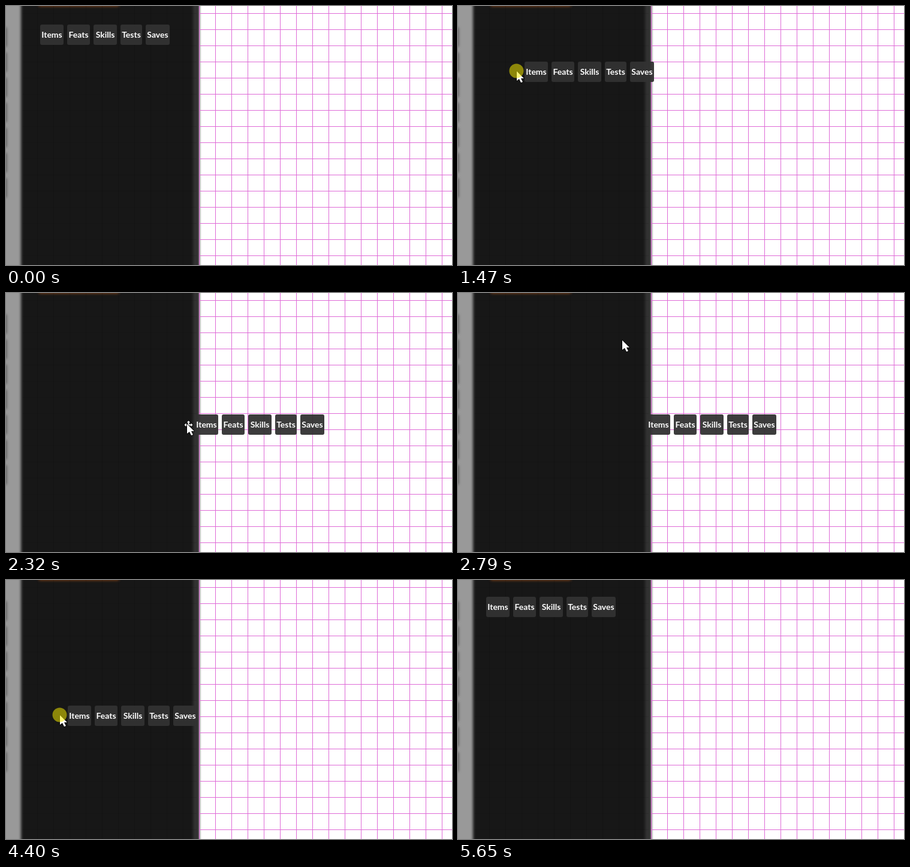
Write an HTML page with a canvas that moves like this. It is 744 px wide and 433 px high and loops after 5.97 s.

```html
<!DOCTYPE html>
<html lang="en">
<head>
<meta charset="utf-8">
<style>
  html, body { margin: 0; width: 744px; height: 433px; overflow: hidden; }
  canvas { display: block; }
</style>
</head>
<body>
<canvas id="stage" width="744" height="433"></canvas>
<script>
const W = 744, H = 433, LOOP = 5970, TICKS = 77, CELL = 27;
const ctx = document.getElementById('stage').getContext('2d', { willReadFrequently: true });

const WEAPONS = ['Bite', 'Claw', 'Tail'];
let right = 0;
const TABS = Object.entries({ Items: 39, Feats: 38, Skills: 39, Tests: 36, Saves: 40 }).map(([text, width]) => {
  const tab = { text, width, left: right };
  right += width + 6;
  return tab;
});

// Turning points of the dragged bar: tick, position.
const BAR = [[13, [57, 31]], [16, [28, 62]], [20, [139, 103]], [25, [343, 159]], [30, [315, 203]],
  [51, [315, 203]], [57, [103, 210]], [62, [67, 67]], [67, [47, 28]]];

const ARROW = new Path2D('M0 0v16l4-3 3 6 3-1-3-6h5z');
const HAND = new Path2D('M-2 1q2-3 4 0v8l5 1q3 1 2 6l-2 7h-8l-5-9q-1-3 2-2l2 2z');
const MOVE = new Path2D('M0-7l3 3h-2v3h3v-2l3 3-3 3v-2h-3v3h2l-3 3-3-3h2v-3h-3v2l-3-3 3-3v2h3v-3h-2z');

function along(keys, n) {
  const i = keys.findIndex(([tick]) => tick >= n);
  if (i < 0) return keys.at(-1)[1];
  if (i === 0) return keys[0][1];
  const [t0, from] = keys[i - 1], [t1, to] = keys[i];
  return from.map((v, k) => Math.round(v + (to[k] - v) * (n - t0) / (t1 - t0)));
}

// The pointer travels between the bar and a few places outside it.
function pointerAt(n, [x, y]) {
  const tab = [x + 22, y + 11], grip = [x - 13, y + 16];
  const enter = [558, 402], aside = [274, 79], leave = [645, 384];
  return along([[1, enter], [8, tab], [9, tab], [11, grip], [30, grip], [32, tab], [33, tab], [36, aside],
    [40, aside], [44, tab], [47, tab], [49, grip], [68, grip], [69, tab], [72, leave]], n);
}

function rect(x, y, w, h, color) {
  ctx.fillStyle = color;
  ctx.fillRect(x, y, w, h);
}

function box(x, y, w, h, radius, color) {
  ctx.beginPath();
  ctx.roundRect(x, y, w, h, radius);
  ctx.fillStyle = color;
  ctx.fill();
}

function label(text, x, y, size) {
  ctx.font = `700 ${size}px Lato, sans-serif`;
  ctx.textAlign = 'center';
  ctx.fillStyle = '#fff';
  ctx.fillText(text, x, y);
}

function glow(color, blur, draw) {
  ctx.save();
  ctx.shadowColor = color;
  ctx.shadowBlur = blur;
  draw();
  ctx.restore();
}

function icon(path, x, y) {
  ctx.save();
  ctx.translate(x, y);
  ctx.lineJoin = 'round';
  ctx.lineWidth = 1.6;
  ctx.strokeStyle = '#000';
  ctx.stroke(path);
  ctx.fillStyle = '#fff';
  ctx.fill(path);
  ctx.restore();
}

function grid(from, to, color) {
  for (let y = 12; y < H; y += CELL) rect(from, y, to - from, 1, color);
  for (let x = 52; x < to; x += CELL) if (x >= from) rect(x, 0, 1, H, color);
}

function drawBackdrop() {
  rect(0, 0, W, H, '#fff');
  rect(0, 0, 60, H, '#999');
  ctx.filter = 'blur(2px)';
  rect(25, -20, 297, H + 40, '#171717');
  rect(312, -20, 9, H + 40, '#333');
  for (let y = 36; y < 290; y += 42) rect(-3, y, 4, 32, '#555');
  box(54, -5, 135, 6, 3, '#743c16');
  ctx.filter = 'none';
  grid(28, 318, 'rgba(0,0,0,.1)');
  grid(322, W, '#df6bd7');
}

function drawBar(x, y, hovered) {
  for (const tab of TABS) {
    const fill = () => box(x + tab.left, y, tab.width, 34, 3, 'rgba(50,50,50,.95)');
    if (tab === hovered) glow('#ff6400', 10, fill);
    else fill();
    label(tab.text, x + tab.left + tab.width / 2, y + 22, 14);
  }
}

function drawWeapons(x, y) {
  glow('#000', 4, () => label('Weapon', x - 28, y + 64, 12));
  WEAPONS.forEach((text, i) => {
    const left = x + 1 + i * 84;
    box(left, y + 46, 72, 30, 2, '#bbb');
    box(left + 1, y + 47, 70, 28, 1, '#323232');
    label(text, left + 36, y + 65, 13);
  });
}

function draw(n) {
  const bar = along(BAR, n), [bx, by] = bar;
  const [px, py] = pointerAt(n, bar);
  const visible = n >= 1 && n <= 72;
  const dragging = (n >= 13 && n < 30) || (n >= 51 && n < 67);
  const dx = px - bx, dy = py - by;
  const over = visible && !dragging && dx >= -20 && dx <= 216 && dy >= 0 && dy <= 34;
  const hovered = over && TABS.find(tab => dx >= tab.left && dx <= tab.left + tab.width);

  ctx.putImageData(backdrop, 0, 0);
  drawBar(bx, by, hovered);
  if (hovered === TABS[0]) drawWeapons(bx, by);
  if (over) icon(MOVE, bx - 10.5, by + 17.5);
  if (visible) icon(hovered ? HAND : ARROW, px, py);
  if (dragging) {
    ctx.beginPath();
    ctx.arc(px - 0.5, py - 0.5, 12, 0, 7);
    ctx.fillStyle = 'rgba(248,236,0,.53)';
    ctx.fill();
  }
}

// Motion is sampled on even ticks, like a screen recording.
function frame() {
  const t = performance.now() % LOOP;
  draw(Math.floor((t + 20) * TICKS / LOOP) % TICKS);
  requestAnimationFrame(frame);
}

drawBackdrop();
const backdrop = ctx.getImageData(0, 0, W, H);
frame();
</script>
</body>
</html>
```
